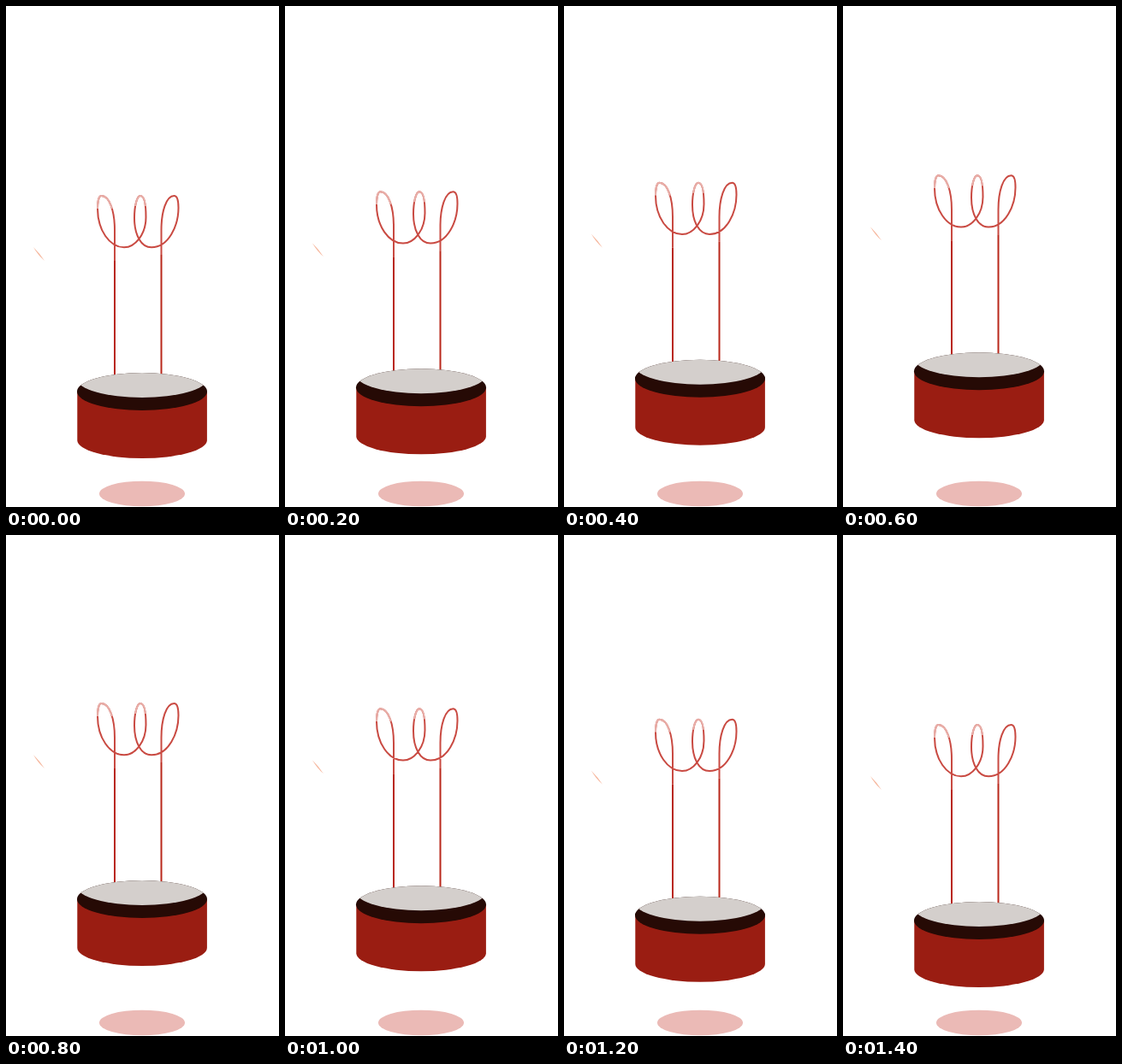
These frames come from a looping animation (319x586 px, 1.5 s). An HTML page:

```html
<!DOCTYPE html>
<html lang="en">
<head>
<meta charset="utf-8">
<style>
  html, body { margin: 0; width: 100%; height: 100%; overflow: hidden; background: #fff; }
  svg { display: block; }
</style>
</head>
<body>
<svg width="319" height="586" viewBox="0 0 319 586">
  <defs>
    <path id="coil" d="M127 298V262C127 240 121 222 111.500 222C108 222 107 231 107 237
      C107 262 121 282.300 138 282.300C151 282.300 163.500 267 163.500 247
      C163.500 230 161 222 157 222C153 222 150 234 150 248
      C150 268 158 282.300 170 282.300C190 282.300 201.500 257 201.500 236
      C201.500 226 199.500 222 196.500 222C187 222 181.500 241 181.500 262V291"/>
    <clipPath id="tips"><path d="M100 215H170V234H140V237H100Z"/></clipPath>
    <clipPath id="rim"><ellipse cx="159" cy="451" rx="76" ry="22"/></clipPath>
  </defs>
  <ellipse cx="159" cy="570.500" rx="50" ry="14.800" fill="#ebbab6"/>
  <g id="float">
    <path d="M32 282Q37 291 45 298Q40 290 32 282Z" fill="#f6b79e"/>
    <g fill="none" stroke-width="2">
      <use href="#coil" stroke="#c94a42"/>
      <use href="#coil" stroke="#e9b0aa" clip-path="url(#tips)"/>
      <path d="M127 298V440M181.500 291V440" stroke="#b9281b"/>
    </g>
    <path d="M83.300 451V508A75.800 21 0 0 0 234.900 508V451Z" fill="#9a1d12"/>
    <ellipse cx="159" cy="451" rx="76" ry="22" fill="#260a05"/>
    <ellipse cx="159" cy="436" rx="76" ry="22" fill="#d4cfcc" clip-path="url(#rim)"/>
  </g>
</svg>
<script>
  const LOOP = 1500, STEP = 100, HEIGHT = 25;
  const float = document.getElementById('float');
  const ease = p => (1 - Math.cos(Math.PI * Math.max(0, Math.min(1, p)))) / 2;

  // Rise, short rest at the top, quicker fall, rest at the bottom.
  const lift = t => HEIGHT * (t < 750 ? ease(t / 700) : 1 - ease((t - 800) / 600));

  function draw() {
    const t = Math.floor(performance.now() % LOOP / STEP) * STEP;
    float.setAttribute('transform', `translate(0 ${-lift(t)})`);
    requestAnimationFrame(draw);
  }
  draw();
</script>
</body>
</html>
```
